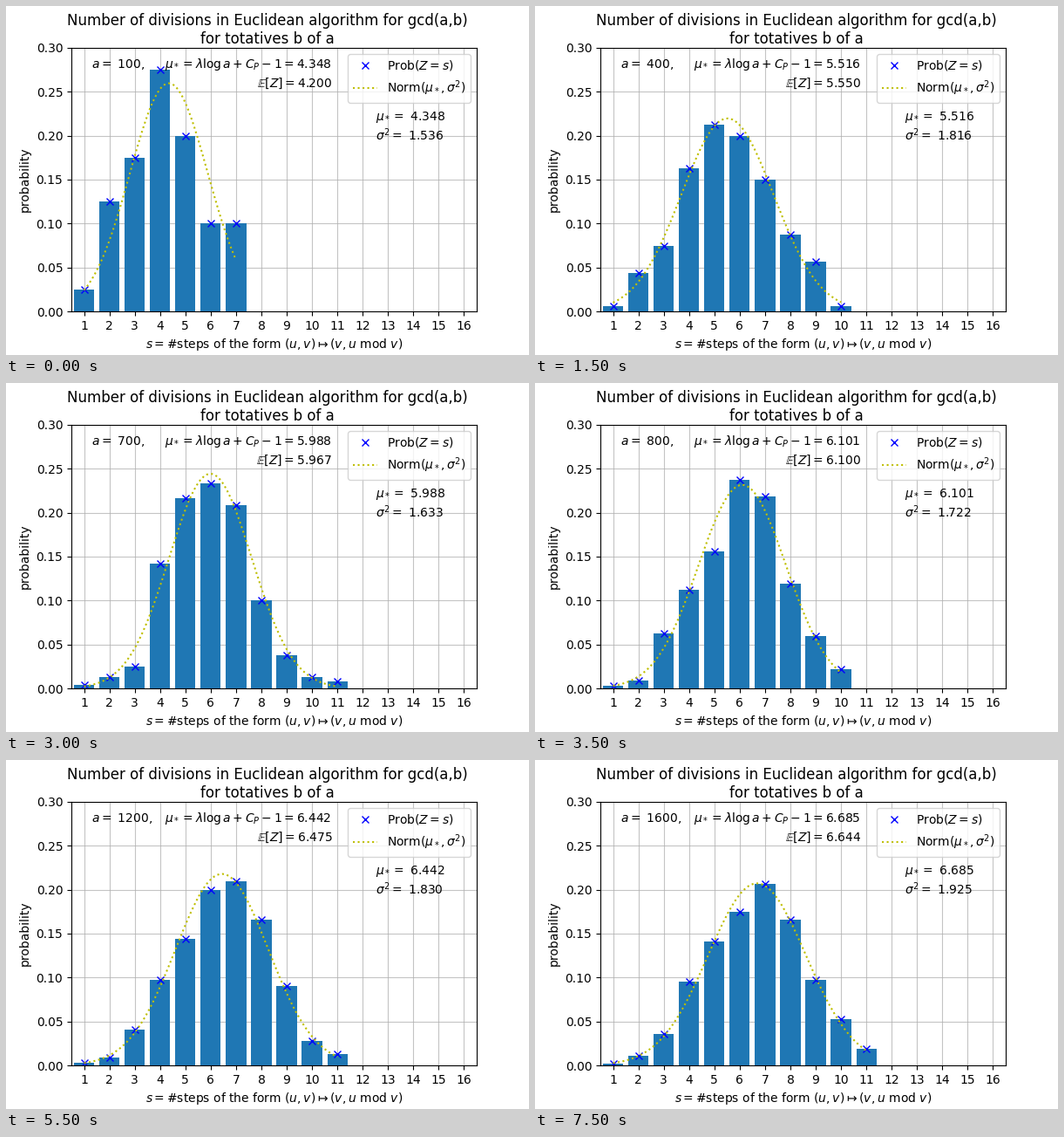
Write a matplotlib script that moves like this. It is 600 by 400 pixels and loops after 8000 ms.

```python
import math

import matplotlib.pyplot as plt
import numpy as np
from matplotlib.animation import FuncAnimation

FRAMES = 16
MAX_STEPS = 16
LAM = 12 * math.log(2) / math.pi ** 2
PORTER = 1.4670780794
MU = r"\mu_{\hspace{0.2}{*}\hspace{0.2}}"


def steps(u, v):
    """Number of divisions the Euclidean algorithm needs for gcd(u, v)."""
    n = 0
    while v:
        u, v = v, u % v
        n += 1
    return n


def distribution(a):
    z = np.array([steps(a, b) for b in range(1, a) if math.gcd(a, b) == 1])
    prob = np.bincount(z, minlength=MAX_STEPS + 1)[1:] / len(z)
    return prob, z.max(), z.mean(), z.std()


fig, ax = plt.subplots(figsize=(6, 4), dpi=100)
fig.subplots_adjust(left=0.125, right=0.9, bottom=0.125, top=0.88)
fig.suptitle("Number of divisions in Euclidean algorithm for gcd(a,b)\n"
             "for totatives b of a")

s = np.arange(1, MAX_STEPS + 1)
bars = ax.bar(s, np.zeros(MAX_STEPS))
marks, = ax.plot([], [], "bx", label="Prob$(Z=s)$")
curve, = ax.plot([], [], "y:", label=rf"Norm$({MU},\sigma^2)$")

ax.set_xlim(0.5, MAX_STEPS + 0.5)
ax.set_ylim(0, 0.3)
ax.set_xticks(s)
ax.set_yticks(np.arange(7) * 0.05)
ax.set_axisbelow(True)
ax.grid(alpha=0.75)
ax.set_xlabel(r"$s=$#steps of the form $(u,v)\mapsto(v,u\ \mathrm{mod}\ v)$")
ax.set_ylabel("probability")
ax.legend(loc="upper right")


def note(x, y, **kw):
    return ax.text(x, y, "", transform=ax.transAxes, **kw)


a_text = note(0.05, 0.925)
mu_text = note(0.23, 0.925)
mean_text = note(0.6435, 0.85, ha="right")
norm_mu = note(0.75, 0.725)
norm_sigma = note(0.75, 0.65)


def update(i):
    a = 100 * (i + 1)
    prob, top, mean, sigma = distribution(a)
    mu = LAM * math.log(a) + PORTER - 1

    for bar, p in zip(bars, prob):
        bar.set_height(p)
    marks.set_data(s[:top], prob[:top])
    x = np.linspace(1, top, 100)
    pdf = np.exp(-((x - mu) / sigma) ** 2 / 2) / (sigma * math.sqrt(2 * math.pi))
    curve.set_data(x, pdf)

    a_text.set_text(f"$a=$ {a},")
    mu_text.set_text(rf"${MU}=\lambda\log a+C_P-1=${mu:.3f}")
    mean_text.set_text(rf"$\mathbb{{E}}[Z]=${mean:.3f}")
    norm_mu.set_text(f"${MU}=$ {mu:.3f}")
    norm_sigma.set_text(rf"$\sigma^2=$ {sigma:.3f}")
    return [*bars, marks, curve, a_text, mu_text, mean_text, norm_mu, norm_sigma]


anim = FuncAnimation(fig, update, frames=FRAMES, interval=500, repeat=True)
plt.show()
```
